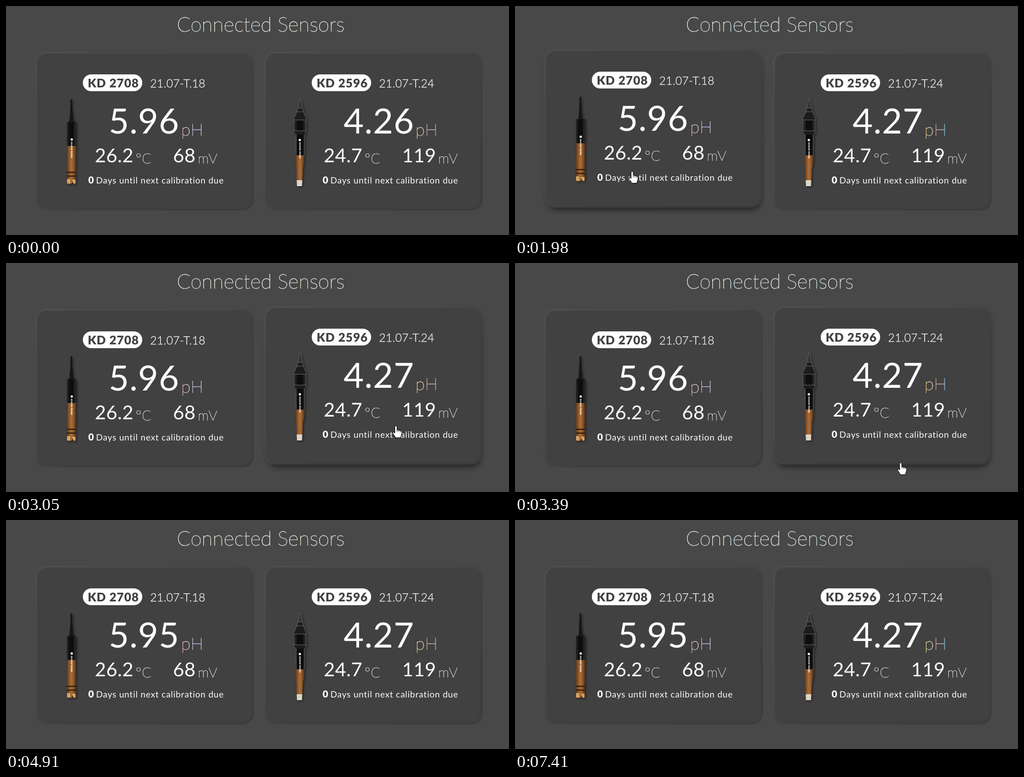
An HTML page that plays this animation: 923 px wide and 422 px high, repeating every 8000 ms.

```html
<!DOCTYPE html>
<html lang="en">
<head>
<meta charset="utf-8">
<title>Connected Sensors</title>
<style>
  html, body { margin: 0; width: 100%; height: 100%; overflow: hidden; background: #484848; }
  svg { display: block; width: 923px; height: 422px; }
  text { font-family: Lato, "Open Sans", sans-serif; fill: #fff; text-rendering: geometricPrecision; }
  .title { font-size: 37px; font-weight: 100; letter-spacing: .1px; text-anchor: middle; fill: url(#titleTint); stroke: url(#titleTint); stroke-width: .55; }
  .badge { font-size: 22px; font-weight: 900; letter-spacing: .8px; fill: #404040; }
  .serial { font-size: 21px; font-weight: 300; letter-spacing: .15px; stroke: #fff; stroke-width: .25; }
  .main { font-size: 64px; letter-spacing: .8px; }
  .side { font-size: 35.2px; letter-spacing: .4px; }
  .unit { font-size: 25.6px; font-weight: 100; letter-spacing: .8px; fill: #f4f4f4; stroke: #f4f4f4; stroke-width: .4; }
  .ph { font-size: 31px; font-weight: 100; letter-spacing: .8px; stroke-width: .5; }
  .count { font-size: 17.6px; font-weight: 900; }
  .due { font-size: 16px; letter-spacing: .7px; }
  .print { font-size: 4px; font-weight: 900; }
</style>
</head>
<body>
<svg id="stage" viewBox="0 0 923 422">
  <defs>
    <linearGradient id="titleTint" gradientUnits="userSpaceOnUse" x1="314" x2="366" y1="0" y2="0" spreadMethod="repeat">
      <stop offset="0" stop-color="#fff"/><stop offset=".35" stop-color="#faf0dd"/>
      <stop offset=".7" stop-color="#d0ebfc"/><stop offset="1" stop-color="#fff"/>
    </linearGradient>
    <linearGradient id="phTint0" gradientUnits="userSpaceOnUse" x1="324" x2="361" y1="0" y2="0">
      <stop offset="0" stop-color="#f4c0b8"/><stop offset=".35" stop-color="#f0e8f0"/>
      <stop offset=".6" stop-color="#c4b8f8"/><stop offset="1" stop-color="#dcd4fa"/>
    </linearGradient>
    <linearGradient id="phTint1" gradientUnits="userSpaceOnUse" x1="754" x2="791" y1="0" y2="0">
      <stop offset="0" stop-color="#f4d890"/><stop offset=".35" stop-color="#f0e6d8"/>
      <stop offset=".55" stop-color="#f4a09c"/><stop offset=".8" stop-color="#c8cce4"/>
      <stop offset="1" stop-color="#78d4f6"/>
    </linearGradient>
    <linearGradient id="bevel" x1="0" y1="0" x2="1" y2="1">
      <stop offset="0" stop-color="#535353"/><stop offset=".45" stop-color="#4a4a4a"/>
      <stop offset=".6" stop-color="#3b3b3b"/><stop offset="1" stop-color="#383838"/>
    </linearGradient>
    <linearGradient id="amber">
      <stop offset="0" stop-color="#5a3519"/><stop offset=".25" stop-color="#8c5527"/>
      <stop offset=".5" stop-color="#ab6f37"/><stop offset=".75" stop-color="#8c5629"/>
      <stop offset="1" stop-color="#54311a"/>
    </linearGradient>
    <linearGradient id="black">
      <stop offset="0" stop-color="#2a2a2a"/><stop offset=".3" stop-color="#0c0c0c"/>
      <stop offset=".75" stop-color="#101010"/><stop offset="1" stop-color="#333"/>
    </linearGradient>
    <filter id="soft"><feGaussianBlur stdDeviation="1"/></filter>
    <filter id="blur" x="-10%" y="-10%" width="120%" height="120%"><feGaussianBlur stdDeviation="4"/></filter>
    <filter id="drop" x="-50%" y="-10%" width="200%" height="120%">
      <feDropShadow dx="2" dy="2" stdDeviation="2" flood-color="#000" flood-opacity=".45"/>
    </filter>
  </defs>
  <rect width="923" height="422" fill="#484848"/>
  <text class="title" x="467.500" y="47">Connected Sensors</text>
  <g id="cards"></g>
  <g id="cursor" stroke="#000" stroke-linejoin="round">
    <path id="arrow" fill="#fff" d="M0 0V16L4 12.5L6.5 18L9 17L6.5 11.5H11.5Z"/>
    <g id="hand">
      <path fill="#fff" d="M-2 1.5Q0 -1.5 2 1.5V7L9 9Q11 10 11 12.5L10 17L8.5 22H-.5L-5.5 14Q-6.5 11 -4 11.5L-2 13.5Z"/>
      <path fill="none" stroke-width=".8" d="M2 7V11M5 8V11.5M8 9V12"/>
    </g>
  </g>
</svg>
<script>
const PERIOD = 8000;
const byId = id => document.getElementById(id);

const print = (x, y) => `
  <circle cx="${x + 1.4}" cy="${y}" r="2.2" fill="#fff"/>
  <text class="print" transform="translate(${x} ${y + 4}) rotate(90)">SENSOR PROBE</text>`;

const slimProbe = `<g filter="url(#drop)">
  <path fill="#191919" d="M118.5 172H121.5L122 192L124 213H127Q129 214 129 217V258H112V217Q112 214 115 213H116.5L118 192Z"/>
  <path fill="url(#black)" d="M113 215H128V258H112.5Z"/>
  <path fill="url(#amber)" d="M112 258H128.5L128 328H124L122.5 324L119 328H111.5Z"/>
  <path fill="#d2a468" d="M112 319H118V327H112ZM121 320H127.5V327H124Z"/>
  <path stroke="#24170d" stroke-width="2" d="M111.5 306.5H128M111.5 313.5H128"/>
  </g>${print(119.2, 246)}`;

const collarProbe = `<g filter="url(#drop)">
  <path fill="#333" stroke="#777" stroke-width=".6" d="M539 171H541L544 188H536Z"/>
  <path fill="#1c1c1c" stroke="#666" stroke-width=".8" d="M536 188H544L546 195L550 206Q551.5 207 550.5 211V230Q551 235 547.5 237V275H532.5V237Q528 235 528.5 230V211Q527.5 207 529 206L534 195Z"/>
  <path fill="url(#black)" d="M529.5 210H549.5V230H529.5ZM533.5 237H546.5V275H533.5Z"/>
  <path fill="none" stroke="#777" stroke-width=".8" d="M529 210H550M529 230H550M534 195H546"/>
  <path fill="url(#amber)" d="M531.5 275H547.5V286L544.5 300L543.5 325H533.5L533 300L531 286Z"/>
  <path fill="#ddd6c8" d="M533.5 321H543.5L543 332H534Z"/>
  </g>${print(537.8, 247)}`;

const sensors = [
  { x: 54, shift: 0, main: 188.5, name: "KD 2708", serial: "21.07-T.18", temp: "26.2", volt: 306.5, unit: 352, probe: slimProbe },
  { x: 474, shift: 430, main: 619.5, name: "KD 2596", serial: "21.07-T.24", temp: "24.7", volt: 727, unit: 793, probe: collarProbe }
];

byId("cards").innerHTML = sensors.map((s, i) => {
  const dx = s.x - 54;
  return `<g id="card${i}">
    <rect id="shadow${i}" x="${s.x + 5}" y="96" width="393" height="286" rx="20" fill="#1c1c1c" filter="url(#blur)"/>
    <rect x="${s.x}" y="85" width="400" height="291" rx="20" fill="#414141"/>
    <rect x="${s.x + 1}" y="86" width="398" height="289" rx="19" fill="none" stroke="url(#bevel)" stroke-width="2.5" filter="url(#soft)"/>
    <rect x="${141 + dx}" y="126" width="109" height="31" rx="15.5" fill="#fff"/>
    <text class="badge" x="${150 + dx}" y="150">${s.name}</text>
    <text class="serial" x="${264.5 + dx}" y="150">${s.serial}</text>
    ${s.probe}
    <text class="main" id="ph${i}" x="${s.main}" y="235"></text>
    <text class="ph" x="${321.5 + s.shift}" y="238.5" style="fill:url(#phTint${i});stroke:url(#phTint${i})">pH</text>
    <text class="side" x="${163 + dx}" y="288">${s.temp}</text>
    <text class="unit" x="${238 + dx}" y="290">°C</text>
    <text class="side" id="volt${i}" x="${s.volt}" y="288"></text>
    <text class="unit" x="${s.unit}" y="290">mV</text>
    <text class="count" x="${151 + s.shift}" y="327">0</text>
    <text class="due" x="${165.3 + s.shift}" y="327">Days until next calibration due</text>
  </g>`;
}).join("");

const ramp = (t, from, to) => {
  const k = Math.min(1, Math.max(0, (t - from) / (to - from)));
  return k * k * (3 - 2 * k);
};

// Last value whose start time has passed.
const stepAt = (t, steps) => steps.filter(([start]) => t >= start).pop()[1];

const readings = {
  ph0: [[0, "5.96"], [4910, "5.95"], [5550, "5.96"], [6170, "5.95"]],
  ph1: [[0, "4.26"], [550, "4.27"], [3650, "4.26"], [4910, "4.27"]],
  volt0: [[0, "68"], [6830, "69"], [7410, "68"]],
  volt1: [[0, "119"]]
};

function setLift(i, amount) {
  byId("card" + i).setAttribute("transform", `translate(0 ${-5 * amount})`);
  byId("shadow" + i).setAttribute("opacity", .7 * amount);
}

function drawCursor(t) {
  const enter = ramp(t, 1385, 1960), cross = ramp(t, 2200, 2480), leave = ramp(t, 3050, 3690);
  const x = 223.5 - 8.5 * enter + 500.5 * cross - 14 * leave;
  const y = 417.5 - 113 * enter - 4.5 * cross + 124 * leave;
  const overCard = y < 376 && (x < 454 || x > 474);
  byId("cursor").setAttribute("transform", `translate(${x} ${y})`);
  byId("cursor").setAttribute("visibility", t >= 1400 && t < 3700 ? "visible" : "hidden");
  byId("hand").setAttribute("display", overCard ? "inline" : "none");
  byId("arrow").setAttribute("display", overCard ? "none" : "inline");
}

function draw(t) {
  for (const id in readings) {
    const value = stepAt(t, readings[id]);
    if (byId(id).textContent !== value) byId(id).textContent = value;
  }
  setLift(0, ramp(t, 1620, 1860) - ramp(t, 2330, 2550));
  setLift(1, ramp(t, 2340, 2560) - ramp(t, 3400, 3650));
  drawCursor(t);
}

const start = performance.now();
function tick() {
  draw((performance.now() - start) % PERIOD);
  requestAnimationFrame(tick);
}
tick();
</script>
</body>
</html>
```
